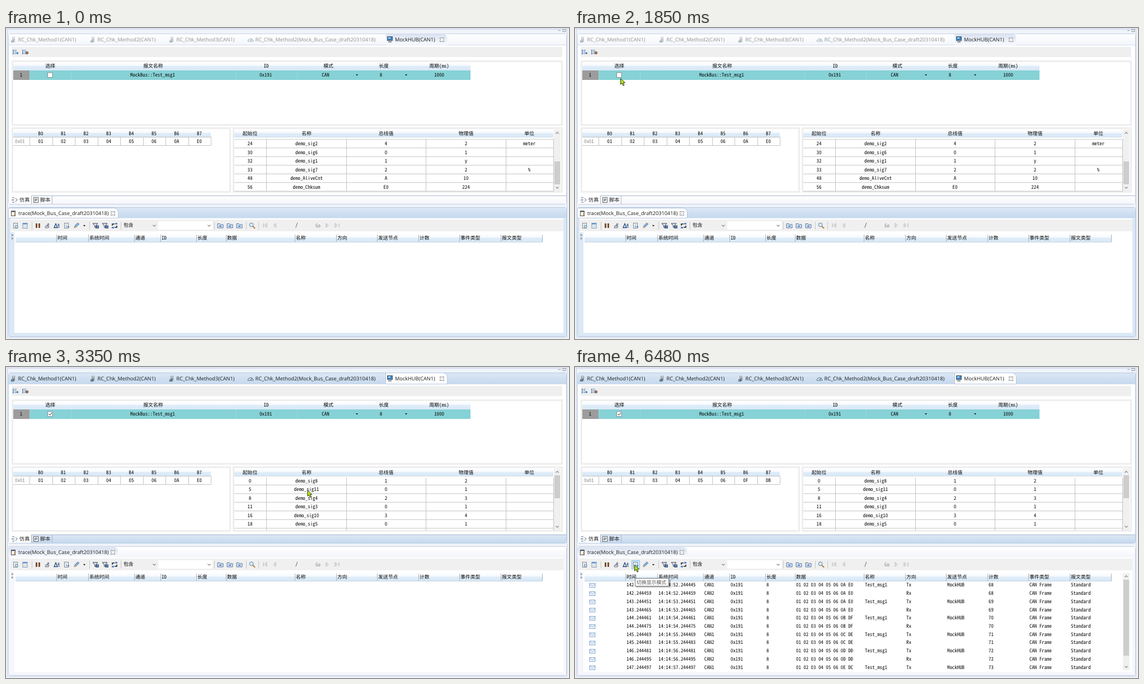
An HTML page that plays this animation: 1006 px wide and 557 px high, repeating every 8 s.

```html
<!DOCTYPE html>
<html lang="zh">
<head>
<meta charset="utf-8">
<title>Bus simulation</title>
<style>
html, body { margin: 0; width: 100%; height: 100%; overflow: hidden; background: #eff3fa; }
svg { display: block; width: 1006px; height: 557px; }
text { text-rendering: geometricPrecision; white-space: pre; }
.mono { font: 8.9px "Noto Sans Mono CJK SC", "Noto Sans Mono CJK JP", "Liberation Mono", monospace; fill: #080808; }
.ui { font: 9.2px "Open Sans", "Noto Sans CJK SC", sans-serif; fill: #1c1c1c; }
.mid { text-anchor: middle; }
.grey { fill: #8a8a8a; }
.strip { fill: url(#plain); }
.tab { fill: url(#soft); stroke: none; }
.edge { fill: #f5f7fc; stroke: #c6d0e1; }
.side { fill: #f5f7fc; }
.dim { opacity: .47; }
.focus .strip { fill: url(#blue); }
.focus .tab { fill: #fff; stroke: #b4c6de; }
.focus .edge { fill: #dbe8f5; stroke: #b7cae2; }
.focus .side { fill: #dbe8f5; }
.focus .dim { opacity: 1; }
</style>
</head>
<body>
<svg id="stage" viewBox="0 0 1006 557"></svg>
<script>
const LOOP = 8000;
const GRID = '#c3c3c3', PALE = '#f0f0f0', INK = '#333';

const rect = (x, y, w, h, fill, extra = '') =>
  `<rect x="${x}" y="${y}" width="${w}" height="${h}" fill="${fill}" ${extra}/>`;
const path = (d, stroke = INK, fill = 'none', extra = '') =>
  `<path d="${d}" stroke="${stroke}" fill="${fill}" ${extra}/>`;
const text = (x, y, s, cls = 'mono', extra = '') =>
  `<text x="${x}" y="${y + 3.1}" class="${cls}" ${extra}>${s}</text>`;
const mid = (x, y, s) => text(x, y, s, 'mono mid');
const group = (content, attrs = '') => `<g ${attrs}>${content}</g>`;
const at = (x, y, content) => group(content, `transform="translate(${x} ${y})"`);
const gradient = (id, ...stops) => `<linearGradient id="${id}" x2="0" y2="1">` +
  stops.map(([o, c]) => `<stop offset="${o}" stop-color="${c}"/>`).join('') + '</linearGradient>';

const frame = (x, y, w, h) => rect(x + 1.5, y + 1.5, w - 3, h - 3, '#fff', 'stroke="#eee" stroke-width="3"');
const verticals = (xs, y, h, color) => path(xs.map(x => `M${x + .5} ${y}v${h}`).join(''), color);
const chevron = (x, y, dir = 1) => path(`M${x - 2.5} ${y - dir * 1.3}l2.5 ${dir * 2.6}l2.5 ${-dir * 2.6}`, '#444');
const dropArrow = (x, y) => path(`M${x - 2} ${y - 1}h4l-2 2.5z`, 'none', '#111');
const scrollbar = (top, bottom, thumbTop, thumbHeight, id) =>
  rect(979, top, 12, bottom - top, PALE) + chevron(985, top + 6, -1) + chevron(985, bottom - 6) +
  rect(980, thumbTop, 10, thumbHeight, '#cdcdcd', `id="${id}"`);
const closeMark = (x, y) => at(x, y, path('M-3.5-3.5h2.5l1 1.5l1-1.5h2.5v2l-1.5 1.5l1.5 1.5v2h-2.5l-1-1.5l-1 1.5h-2.5v-2l1.5-1.5l-1.5-1.5z', '#777', '#fff', 'stroke-width=".8"'));

// Small icons, drawn around their centre
const icons = {
  ecu: rect(-2, -5, 5, 9, '#8d9299') + rect(-1, -4, 3, 2, '#dce4ea') + rect(-4, 1, 5, 4, '#557183') + rect(-3, 2, 2, 1, '#9cd45b'),
  gauge: path('M-5 3a5 5 0 0 1 10 0z', '#587587', '#c9dae5') + path('M0 2l3-3', '#333'),
  monitor: rect(-4.5, -4.5, 9, 7, '#3d84c0', 'stroke="#4d5964"') + rect(-3, -3, 4, 2, '#b7defa') + rect(-3, 4, 6, 1.5, '#666'),
  list: [-4, -1, 2].map(y => rect(-5, y, 2, 2, '#3979c4') + rect(-2, y, 4, 1.3, '#7897bb')).join(''),
  doc: rect(-3.5, -4.5, 7, 9, '#fff', 'stroke="#6f7780" stroke-width=".9"') + path('M-2-2h4M-2 0h4M-2 2h3', '#8ba7c8', 'none', 'stroke-width=".8"'),
  table: rect(-4, -4.5, 8, 9, '#fff', 'stroke="#6b87a9" stroke-width=".9"') + rect(-4, -4.5, 8, 2.5, '#6e9fd0') + path('M-3 0h6M-3 2h6', '#9ab0c8', 'none', 'stroke-width=".7"'),
  pause: rect(-4, -4, 3, 8, '#7b5033') + rect(1, -4, 3, 8, '#7b5033'),
  brush: path('M1-4l2 1l-2 4l-2-1z', '#557', '#87a7ce', 'stroke-width=".7"') + path('M-4 4l1-4l6 1l-1 3z', '#666', '#c5cedb', 'stroke-width=".8"'),
  delta: path('M-5 3.5h6l-3-7z', '#234a80', 'none', 'stroke-width="1.3"') + path('M3-4v7h2M1-1h4', '#234a80'),
  pen: path('M-4 4l1-4l5-5l3 2l-5 5z', '#63788d', '#7eb3e3', 'stroke-width=".8"') + path('M-4 4l2-3l2 2z', 'none', '#e8a13b'),
  filter: path('M-5-4h9l-3.5 4v4l-2-1v-3z', '#303f55', '#e2eaf5') + rect(1, 0, 4.5, 4.5, '#5b86bd', 'stroke="#303f55" stroke-width=".8"'),
  swap: path('M-4 0v-3h4M4 0v3h-4', '#222', 'none', 'stroke-width="1.6"') + rect(1, -5, 4, 3, '#5b8ec9') + rect(-5, 2, 4, 3, '#5b8ec9'),
  folder: path('M-5-3.5h4l1 1.5h5v6h-10z', '#4d6b94', '#d3e2f5', 'stroke-width=".9"') + rect(-2, 0, 4, 2, '#557fb4'),
  search: path('M1 1l4 4', '#b98235', 'none', 'stroke-width="2"') + '<circle cx="-1.5" cy="-1.5" r="3.4" fill="#d9edfb" stroke="#60809f"/>',
  tree: path('M-4-4h4M-4 0h4M-4 4h4M2-3l3 3l-3 3', '#47617d') + rect(-5, -1, 3, 2, '#8d9aa8'),
  script: rect(-3.5, -4.5, 8, 9, '#fff', 'stroke="#555" stroke-width=".9"') + path('M-1 3v-5h3v2.5h-3', '#456'),
  log: rect(-3.5, -4, 7, 8.5, '#fff', 'stroke="#4a4a4a"') + rect(-3.5, -4.5, 7, 2, '#4a4a4a') + path('M2.500-1v5', '#c79a5b', 'none', 'stroke-width="2"'),
  mail: rect(-5, -3.5, 10, 7, '#f1f6fd', 'stroke="#779bcb" stroke-width=".9"') + path('M-5-3l5 4l5-4', '#779bcb', 'none', 'stroke-width=".8"'),
};
const icon = (name, x, y) => at(x, y, icons[name]);

function editorPanel() {
  const tabs = [['ecu', 13, 'RC_Chk_Method1(CAN1)'], ['ecu', 155, 'RC_Chk_Method2(CAN1)'],
    ['ecu', 296, 'RC_Chk_Method3(CAN1)'], ['gauge', 437, 'RC_Chk_Method2(Mock_Bus_Case_draft20310418)']];
  const strip = rect(4.5, 10.5, 997, 305, '#fff', 'class="edge" rx="3"') + rect(5, 11, 996, 19, '', 'class="strip"') +
    path('M5 30.5h996', '#d3dcea') +
    group(tabs.map(([i, x, s]) => icon(i, x, 21) + text(x + 8.5, 21, s, 'ui')).join(''), 'class="dim"') +
    path('M678.5 30.5v-20h103q7 1 7 8v12z', '', '', 'class="tab"') +
    icon('monitor', 686, 20) + text(695, 21, 'MockHUB(CAN1)', 'ui') + closeMark(779, 21) +
    rect(5, 31, 996, 269, '#fff') + rect(10, 34, 984, 18, '#efefef') + icon('list', 17, 43) + icon('list', 34, 43) +
    '<circle cx="20.5" cy="45" r="1.8" fill="#4d7eb5"/><circle cx="37.5" cy="44.5" r="2.3" fill="#bd6f50" stroke="#444" stroke-width=".7"/>';

  const messageHeads = [[79, '选择'], [263, '报文名称'], [465, 'ID'], [576, '模式'], [675, '长度'], [774, '周期(ms)']];
  const message = [[27, '1'], [262, 'MockBus::Test_msg1'], [464, '0x191'], [571, 'CAN'], [670, '8'], [774, '1000']];
  const messages = frame(10, 58, 985, 117) + rect(13, 61, 817, 15, 'url(#head)') + rect(13, 76, 817, 17, '#86d2d6') +
    rect(13, 76, 29, 17, '#9c9c9c') + verticals([42, 116, 410, 520], 77, 15, '#9bd9dc') +
    messageHeads.map(([x, s]) => mid(x, 68, s)).join('') + message.map(([x, s]) => mid(x, 84, s)).join('') +
    dropArrow(627, 84) + dropArrow(715, 84) + rect(74.5, 80, 8.5, 8.5, '#fff', 'stroke="#888" stroke-width=".9"') +
    path('M76.5 84l2 2.2l3.3-4.2', '#222', 'none', 'id="check"');

  const bytes = ['01', '02', '03', '04', '05', '06', '0A', 'E0'];
  const byteX = i => 62 + i * 40.5;
  const data = frame(10, 178, 392, 117) + rect(13, 182, 353, 13, 'url(#head)') +
    path('M13 195.5h353.5M13 210.5h353.5', GRID) +
    verticals([42, ...bytes.map((_, i) => Math.round(82.5 + i * 40.5))], 195, 15, GRID) +
    text(16, 203, '0x01', 'mono grey', 'font-style="italic"') +
    bytes.map((b, i) => mid(byteX(i), 188.5, 'B' + i) +
      text(byteX(i), 202.5, b, 'mono mid', `id="byte${i}"`)).join('');

  const columns = [436, 537, 679, 822, 935];
  const signals = ['0 sig8 1 2', '5 sig11 0 1', '8 sig4 2 3', '11 sig3 0 1', '16 sig10 3 4', '18 sig5 0 1',
    '24 sig2 4 2 meter', '30 sig6 0 1', '32 sig1 1 y', '33 sig7 2 2 %', '48 AliveCnt A 10', '56 Chksum E0 224'];
  const signalRows = signals.map((line, r) => {
    const top = 195.8 + r * 15.5;
    return path(`M408 ${top + 15.5}h570`, GRID) + line.split(' ').map((s, c) =>
      mid(columns[c], top + 7.6, c === 1 ? 'demo_' + s : s)).join('');
  }).join('');
  const signalTable = frame(405, 178, 590, 117) + rect(408, 182, 570, 13.5, 'url(#head)') +
    ['起始位', '名称', '总线值', '物理值', '单位'].map((s, i) => mid(columns[i], 188.5, s)).join('') +
    path('M408 195.5h570', '#d5dde5') +
    group(group(signalRows, 'id="signals"') + verticals([465, 608, 750, 893, 978], 196, 97, GRID), 'clip-path="url(#list)"') +
    group(rect(408, 280, 570, 12, PALE) + path('M415.5 283.5l-2.5 2.5l2.5 2.5M971 283.5l2.5 2.5l-2.5 2.5', '#aaa'), 'id="sideScroll"') +
    scrollbar(182, 292, 194, 41, 'signalThumb');

  const pages = rect(45, 300.5, 956, 14.5, '', 'class="strip"') + rect(5, 300, 40, 15, '#fff') +
    path('M45.5 300v15M82.5 301v14M45 300.5h956', '#a9b6c8') +
    icon('tree', 15, 308) + text(24, 308, '仿真', 'ui') + icon('script', 53, 308) + text(61, 308, '脚本', 'ui');
  return strip + messages + data + signalTable + pages;
}

const TRACE_X = [92, 149, 231, 278, 342, 395, 518, 592, 665, 739, 812, 886];
const hex = n => n.toString(16).toUpperCase().padStart(2, '0');
// The alive counter and its checksum always add up to 0xEA
const counterBytes = n => [hex(n), hex(0xEA - n)];

function traceRow(i) {
  const cycle = i >> 1, received = i % 2;
  const micros = 244445 + [0, 6, 16, 24, 36, 52][cycle] + received * 14;
  const payload = ['01 02 03 04 05 06', ...counterBytes(10 + Math.max(0, cycle - 1))].join(' ');
  const cells = [`${142 + cycle}.${micros}`, `14:14:${52 + cycle}.${micros}`, 'CAN' + (1 + received), '0x191', '8', payload,
    received ? '' : 'Test_msg1', received ? 'Rx' : 'Tx', received ? '' : 'MockHUB', 68 + cycle, 'CAN Frame', 'Standard'];
  const y = 390.2 + i * 14.74;
  return group(icon('mail', 31, y + 1) + cells.map((s, c) => text(TRACE_X[c], y, s)).join(''), 'class="row"');
}

function tracePanel() {
  const heads = ['时间', '系统时间', '通道', 'ID', '长度', '数据', '名称', '方向', '发送节点', '计数', '事件类型', '报文类型'];
  const tools = [['doc', 17], ['table', 34], ['pause', 57], ['brush', 74], ['delta', 91], ['doc', 108], ['pen', 126],
    ['filter', 160], ['filter', 177], ['swap', 194], ['folder', 383], ['folder', 400], ['folder', 417], ['search', 440]];
  return rect(4.5, 321.5, 997, 231, '', 'class="edge" rx="3"') + rect(5, 322, 996, 18, '', 'class="strip"') +
    path('M4.5 340.5v-18h189q6 1 7 7v11z', '', '', 'class="tab"') + icon('log', 13, 332) +
    text(22, 332, 'trace(Mock_Bus_Case_draft20310418)', 'ui') + closeMark(191, 332) +
    rect(8, 341, 988, 205, '#fff') + rect(8, 343, 988, 21, PALE) + rect(8, 366, 7, 180, '', 'class="side"') +
    rect(101.5, 346.5, 14, 15, '#cce6fa', 'stroke="#8cc4ec" id="hover"') +
    tools.map(([name, x]) => icon(name, x, 354)).join('') +
    '<circle cx="19" cy="356" r="2.3" fill="#d8edfb" stroke="#537d9e"/>' + path('M107 356h6l-2-2m2 2l-2 2', '#3779bc') +
    dropArrow(140, 354) + verticals([46, 149, 205, 372, 429, 451], 347, 14, '#c9c9c9') +
    text(210, 353, '包含', 'mono') + chevron(265, 354) + rect(272, 346, 97, 15, '#fff') + chevron(363, 354) +
    path('M460 350v7M466 350l-4 3.5l4 3.5zM482 350l-4 3.5l4 3.5zM572 350l4 3.5l-4 3.5zM588 350l4 3.5l-4 3.5zM595 350v7', '#aaa', 'none', 'stroke-width=".9"') +
    text(517, 353, '/') + text(553, 354, 'Go', 'mono grey') +
    path('M10 368.5l3.5 2.5l-3.5 2.5zM10 374.5l3.5 2.5l-3.5 2.5z', 'none', '#8d9cad') +
    rect(17, 368.5, 942, 15, 'url(#head)') + path('M17 383.5h942', '#c5d4e2') +
    verticals([...TRACE_X.map(x => Math.floor(x - 1.5)), 958], 370, 13, '#a8b4c0') +
    heads.map((s, i) => text(TRACE_X[i], 376, s)).join('') +
    Array.from({ length: 11 }, (_, i) => traceRow(i)).join('') +
    group(scrollbar(369, 543, 381, 136, 'traceThumb'), 'id="traceScroll"');
}

const stage = document.getElementById('stage');
stage.innerHTML = '<defs>' +
  gradient('head', [0, '#fff'], [.42, '#f5f9fd'], [.5, '#dfedf9'], [1, '#d8e8f6']) +
  gradient('blue', [0, '#dbe7f5'], [1, '#c6d9ee']) + gradient('plain', [0, '#fff'], [1, '#f4f6fb']) +
  gradient('soft', [0, '#dae2f1'], [1, '#f8faff']) +
  '<clipPath id="list"><rect x="408" y="198.5" width="571" height="94.5"/></clipPath></defs>' +
  rect(0, 0, 1006, 557, '#eff3fa') + path('M2.5 2v552h1000V2zM0 1.5h1006', '#cad4e4') +
  path('M987 4.5h4M995 2.5h5v4h-5z', '#8c96a5') +
  group(editorPanel(), 'id="editor"') + group(tracePanel(), 'id="trace"') +
  group(rect(109, 380, 62, 15, '#000', 'opacity=".25"') + rect(107.5, 378.5, 60, 14, '#fff', 'stroke="#777"') +
    text(110, 385.5, '切换显示模式', 'ui', 'style="font-size:8.9px;fill:#555"'), 'id="tooltip"') +
  group(path('M.5.5v10.5l2.5-2.3l2 4.5l2-.9l-2-4.3h3.5z', '#222', '#b5ee00', 'stroke-width=".9"'), 'id="cursor"');

const $ = id => document.getElementById(id);
const rows = [...document.querySelectorAll('.row')];
const show = (el, on) => { el.style.display = on ? '' : 'none'; };
const stepped = (t, steps) => steps.reduce((value, [time, next]) => t >= time ? next : value, 0);

const ROUTE = [[790, 944, 545], [1010, 501, 267], [1130, 180, 163], [1220, 5, 106], [1400, 40, 100], [1580, 72, 95],
  [1720, 85, 94], [1850, 81, 90], [2110, 81, 90], [2280, 79, 82], [2740, 79, 82], [2850, 365, 168], [2970, 516, 211],
  [3030, 516, 211], [3220, 540, 222], [3380, 538, 220], [3550, 538, 220], [3620, 539, 221], [4020, 539, 222],
  [4230, 531, 229], [4700, 531, 229], [4710, 531, 230], [5850, 531, 230], [6130, 300, 295], [6400, 106, 354], [LOOP, 106, 354]];
const ROW_COUNT = [[4090, 2], [4230, 0], [4420, 4], [5260, 6], [5900, 8], [6120, 10], [6340, 11]];
const COUNTER = [[0, 10], [4090, 11], [4850, 12], [5900, 13], [6120, 14], [6340, 15]];

function cursorAt(t) {
  const i = Math.max(1, ROUTE.findIndex(([time]) => time > t));
  const [t0, x0, y0] = ROUTE[i - 1], [t1, x1, y1] = ROUTE[i];
  const p = (t - t0) / (t1 - t0);
  return [x0 + (x1 - x0) * p, y0 + (y1 - y0) * p];
}

function draw(now) {
  const t = now % LOOP;
  const scrolled = t >= 3030, refreshed = t >= 2930;
  $('editor').classList.toggle('focus', refreshed);
  $('trace').classList.toggle('focus', !scrolled);
  show($('check'), t >= 2510);
  show($('sideScroll'), refreshed && !scrolled);
  $('signalThumb').setAttribute('y', refreshed ? 194 : 239);
  $('signals').setAttribute('transform', `translate(0 ${scrolled ? 0 : -89.5})`);
  [$('byte6').textContent, $('byte7').textContent] = counterBytes(stepped(t, COUNTER));
  const count = stepped(t, ROW_COUNT);
  rows.forEach((row, i) => show(row, i < count));
  show($('traceScroll'), count > 10);
  show($('hover'), t >= 6400);
  show($('tooltip'), t >= 6480);
  show($('cursor'), t >= 790);
  $('cursor').setAttribute('transform', `translate(${cursorAt(t)})`);
  requestAnimationFrame(draw);
}
draw(performance.now());
</script>
</body>
</html>
```
